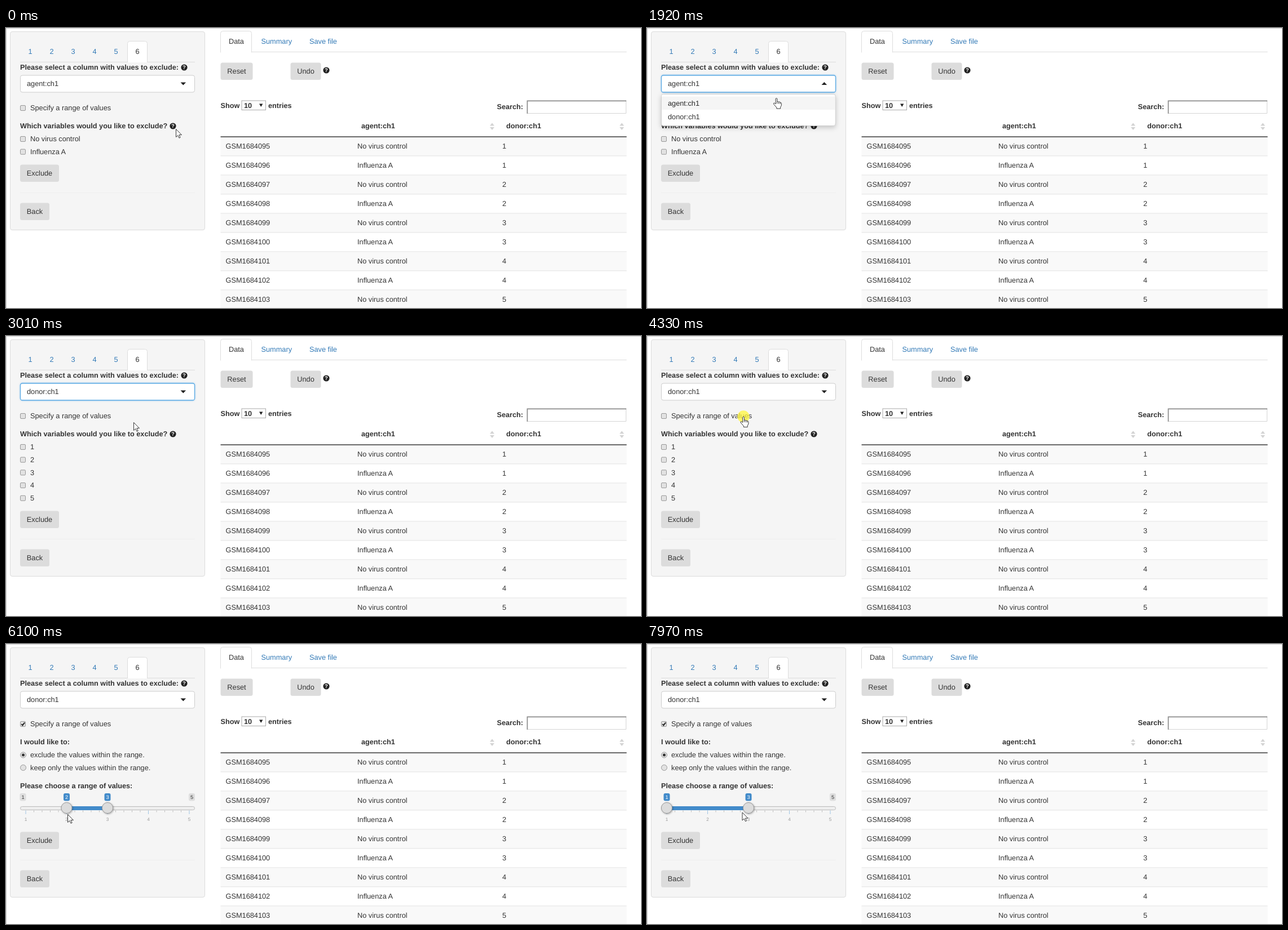
An HTML page for the animation above (8000 ms loop, 1126 px wide and 497 px high).

```html
<!DOCTYPE html>
<html lang="en">
<head>
<meta charset="utf-8">
<title>Exclude values</title>
<style>
  html, body { margin: 0; width: 100%; height: 100%; overflow: hidden; background: #fff; }
  svg { display: block; width: 1126px; height: 497px; }
  text { font: 12.75px "Liberation Sans", Arial, sans-serif; fill: #333; text-rendering: geometricPrecision; white-space: pre; }
  .b { font-weight: bold; font-size: 12.68px; }
  .mid { text-anchor: middle; }
  .link { fill: #337ab7; }
  .help { font-size: 9.5px; font-weight: bold; fill: #fff; }
  .badge { font-size: 9.2px; }
  .grid { font-size: 8.2px; fill: #999; }
  .inv { fill: #fff; }
  .btn { fill: #dcdcdc; }
  .line { stroke: #ddd; fill: none; }
  .box { fill: #e2e2e2; stroke: #989898; }
  .cursor path { fill: #fff; stroke: #222; stroke-width: .9; stroke-linejoin: round; }
  .option rect { fill: #fff; }
  .option.active rect { fill: #f5f5f5; }
  .active text { fill: #262626; }
  #field { fill: #fff; stroke: #ccc; }
  #field.focus { stroke: #5aa9e3; stroke-width: 1.3; filter: drop-shadow(0 0 1.5px rgba(102, 175, 233, .6)); }
  #list { filter: drop-shadow(0 3px 4px rgba(0, 0, 0, .2)); }
</style>
</head>
<body>
<svg id="stage" viewBox="0 0 1126 497"></svg>
<script>
// Markup helpers; text is placed by its vertical centre
const text = (x, y, str, cls = '') => `<text x="${x}" y="${y + 4.1}" class="${cls}">${str}</text>`;
const small = (x, y, str, cls) => `<text x="${x}" y="${y + 3.2}" class="mid ${cls}">${str}</text>`;
const rect = (x, y, w, h, attrs = '') => `<rect x="${x}" y="${y}" width="${w}" height="${h}" ${attrs}/>`;
const path = (d, attrs = '') => `<path d="${d}" ${attrs}/>`;
const circle = (x, y, r, attrs = '') => `<circle cx="${x}" cy="${y}" r="${r}" ${attrs}/>`;
const group = (id, body, attrs = '') => `<g id="${id}" ${attrs}>${body}</g>`;
const help = (x, y) => circle(x, y, 5.6, 'fill="#222"') + small(x, y + .2, '?', 'help');
const button = (x, y, w, str) =>
  rect(x, y, w, 30.5, 'rx="3.5" class="btn"') + text(x + w / 2, y + 15.3, str, 'mid');
const check = (y, str) => rect(25.5, y - 4.5, 9, 9, 'rx="1.5" class="box"') + text(43, y, str);
const radio = (y, str) => circle(30.5, y, 5, 'class="box"') + text(43, y, str);
const tab = (x, y, w, h) =>
  path(`M${x} ${y + h}V${y + 4}q0 -4 4 -4h${w - 8}q4 0 4 4v${h - 4}`, 'class="line" style="fill:#fff"');
const choices = (id, items) =>
  group(id, items.map((s, i) => check(197 + i * 22.7, s)).join(''));
const sorter = x =>
  path(`M${x - 4} 173.5h8l-4 -5zM${x - 4} 176h8l-4 5z`, 'fill="#d3d3d3"');

const valueX = v => 35 + (v - 1) * 72.5;

function sidebar() {
  const tabs = [1, 2, 3, 4, 5, 6]
    .map(n => text(5 + n * 38, 41.7, n, n < 6 ? 'mid link' : 'mid')).join('');
  return rect(7.5, 6.5, 345, 352, 'id="panel" rx="3.5" fill="#f5f5f5" stroke="#dcdcdc"')
    + path('M25 60.5H335', 'class="line"') + tab(215.5, 23.5, 35, 37.5) + tabs
    + text(25, 70, 'Please select a column with values to exclude:', 'b') + help(316, 70)
    + rect(25.5, 84, 309, 30, 'rx="3.5" id="field"')
    + text(37, 99.3, '').replace('<text', '<text id="chosen"')
    + path('', 'id="caret" fill="#222"')
    + check(142, 'Specify a range of values')
    + path('M27.3 142l2 2.4l3.8 -5', 'id="tick" fill="none" stroke="#222" stroke-width="1.9"')
    + group('which', text(25, 173.8, 'Which variables would you like to exclude?', 'b') + help(296, 174))
    + choices('agents', ['No virus control', 'Influenza A'])
    + choices('donors', [1, 2, 3, 4, 5])
    + group('range', range())
    + group('foot', button(25, 242.5, 69, 'Exclude')
      + path('M25 292.5H335', 'stroke="#eee"') + button(25, 310.5, 52, 'Back'))
    + group('list', rect(25.5, 117.5, 308.5, 56, 'rx="3" fill="#fff" stroke="#d0d0d0"')
      + option('agent', 133.7) + option('donor', 157.4));
}

const option = (name, y) =>
  group(name, rect(26, y - 12, 307.5, 23.5) + text(37, y, name + ':ch1'), 'class="option"');

const badge = (x, n, live) =>
  rect(x - 5.5, 265, 11, 13.5, `rx="3" fill="${live ? '#428bca' : '#dedede'}"`)
  + small(x, 272, n, live ? 'badge inv' : 'badge');

const thumb = (id, v) =>
  group(id, badge(valueX(v), v, true).replace('<text', `<text id="${id}Value"`)
    + circle(valueX(v), 291, 9.6, 'fill="#dcdcdc" stroke="#999" style="filter:drop-shadow(1px 1px 1.5px rgba(0,0,0,.3))"'));

function range() {
  let ticks = '', labels = '';
  for (let i = 0; i <= 20; i++) {
    const big = i % 5 === 0, x = valueX(1 + i / 5);
    ticks += path(`M${x} 295.5v${big ? 6.5 : 3}`, `stroke="${big ? '#9fc4e3' : '#bbb'}"`);
    if (big) labels += small(x, 311, 1 + i / 5, 'grid');
  }
  return text(25, 173.8, 'I would like to:', 'b')
    + radio(197, 'exclude the values within the range.') + circle(30.5, 197, 2.5, 'fill="#333"')
    + radio(219.5, 'keep only the values within the range.')
    + text(25, 251.5, 'Please choose a range of values:', 'b')
    + group('min', badge(30, 1)) + badge(329.5, 5)
    + ticks + labels
    + rect(25.5, 288.5, 309, 6, 'rx="3" fill="#eee" stroke="#bbb"')
    + rect(0, 288, 0, 7, 'id="bar" fill="#428bca"')
    + thumb('low', 2) + thumb('high', 3);
}

function results() {
  let rows = '';
  for (let i = 0; i < 9; i++) {
    const y = 209.8 + i * 34;
    rows += rect(380.5, y - 16, 720, 33, `fill="${i % 2 ? '#fff' : '#f9f9f9'}"`)
      + path(`M380.5 ${y + 17.2}H1100.5`, 'class="line"')
      + text(389.5, y, 'GSM' + (1684095 + i))
      + text(623, y, i % 2 ? 'Influenza A' : 'No virus control')
      + text(880, y, 1 + (i >> 1));
  }
  return path('M380.5 42.5H1100.5', 'class="line"') + tab(380.5, 5.5, 55, 38)
    + text(408.5, 23.6, 'Data', 'mid') + text(452.5, 23.6, 'Summary', 'link') + text(538, 23.6, 'Save file', 'link')
    + button(380.5, 61.5, 57, 'Reset') + button(504.5, 61.5, 54, 'Undo') + help(568, 75)
    + text(380.5, 137.5, 'Show', 'b') + rect(418, 129, 42.5, 16.5, 'fill="#fff" stroke="#aaa"')
    + text(422, 137.5, '10', 'b') + path('M449 134.5h6.4l-3.2 5.5z', 'fill="#222"')
    + text(465, 137.5, 'entries', 'b') + text(870.5, 140, 'Search:', 'b')
    + rect(924, 129, 176, 23, 'fill="#fff"')
    + path('M924 151.5H1099.5V129', 'stroke="#d5d5d5" fill="none"')
    + path('M924.4 152V129.4H1100', 'stroke="#8c8c8c" stroke-width="1.7" fill="none"')
    + text(630, 174.3, 'agent:ch1', 'b') + text(887, 174.3, 'donor:ch1', 'b')
    + sorter(862) + sorter(1092) + rows
    + path('M380.5 193.2H1100.5', 'stroke="#111" stroke-width="1.2"');
}

const pointer = circle(0, 0, 10.7, 'id="press" fill="#fff53c" opacity=".75"')
  + group('arrow', path('M.5 .5V14.6L3.7 11.6L6 16.3L8.1 15.3L5.9 10.7H10.4Z'))
  + group('hand', path('M4.3 1.6q0 -1.3 1.3 -1.3t1.4 1.3V7q.5 -1.2 1.7 -.9q.9 .2 1 1.1q.6 -.9 1.8 -.4q.7 .3 .8 1.2q.7 -.5 1.6 .2q.6 .4 .6 1.6V13l-1.7 3.2v2.5H6v-1.9L1 11q-1 -1.3 0 -2q1 -.5 2 .4l1.3 1.3Z')
    + path('M7 7v3M9.7 7.2v3M12.3 8v2.5'), 'transform="translate(-5.6)"');

document.getElementById('stage').innerHTML = sidebar() + results()
  + path('M.5 497V.5H1126', 'stroke="#cfcfcf" fill="none"')
  + group('cursor', pointer, 'class="cursor"');

const el = {};
document.querySelectorAll('[id]').forEach(e => el[e.id] = e);
const show = (id, on) => el[id].style.display = on ? '' : 'none';
const within = (t, a, b) => t >= a && t < b;

// Pointer moves: start, end, number of steps, destination
const moves = [
  [70, 600, 8, 236, 89], [830, 830, 1, 234, 88],
  [1540, 2310, 11, 226, 152], [2380, 2460, 2, 226, 153],
  [3240, 3850, 9, 171, 143], [4940, 5730, 11, 155, 228],
  [5800, 6100, 5, 109, 302], [6180, 6350, 3, 107, 294],
  [6740, 7280, 8, 36, 292], [7660, 7970, 5, 168.5, 298.5]
];
const presses = [[1140, 1310], [2770, 3010], [4330, 4480], [6570, 7510]];

function pointerAt(t) {
  let x = 301, y = 179;
  for (const [start, end, steps, toX, toY] of moves) {
    if (t < start) break;
    const gap = (end - start) / (steps - 1) || 1;
    const p = Math.min(steps, Math.floor((t - start + 15) / gap) + 1) / steps;
    const ease = p * p * (3 - 2 * p);
    x += (toX - x) * ease;
    y += (toY - y) * ease;
  }
  return [x, y];
}

function render(t) {
  const [x, y] = pointerAt(t);
  const open = within(t, 1210, 2850), donor = t >= 2850;
  const checked = t >= 4480, ranged = t >= 4710;
  const drag = within(t, 6570, 7510);
  const low = t >= 6740 && (x < 71 || t >= 7280) ? 1 : 2, lowX = valueX(low);

  el.field.classList.toggle('focus', within(t, 1140, 4330));
  el.chosen.textContent = donor ? 'donor:ch1' : 'agent:ch1';
  el.caret.setAttribute('d', open ? 'M309.5 101h9.6l-4.8 -5z' : 'M309.5 96.5h9.6l-4.8 5z');
  show('list', open);
  el.agent.classList.toggle('active', y < 146);
  el.donor.classList.toggle('active', y >= 146);

  show('tick', checked);
  show('which', !checked);
  show('agents', t < 2930);
  show('donors', within(t, 2930, 4480));
  show('range', ranged);
  const shift = ranged ? 91 : checked ? -79 : t >= 2930 ? 68 : 0;
  el.foot.setAttribute('transform', `translate(0 ${shift})`);
  el.panel.setAttribute('height', 352 + shift);

  show('min', low > 1);
  el.low.setAttribute('transform', `translate(${lowX - valueX(2)})`);
  el.lowValue.textContent = low;
  el.bar.setAttribute('x', lowX);
  el.bar.setAttribute('width', valueX(3) - lowX);

  const hand = drag
    || within(y, 84, 115)
    || open
    || (x < 187 && within(y, 133, 152))
    || (ranged && x < 256 && within(y, 188, 228))
    || (ranged && Math.hypot(x - lowX, y - 291) < 10);
  show('hand', hand);
  show('arrow', !hand);
  show('press', presses.some(([a, b]) => within(t, a, b)));
  el.cursor.setAttribute('transform', `translate(${x} ${y})`);
}

const begin = performance.now();
function tick() {
  render((performance.now() - begin) % 8000);
  requestAnimationFrame(tick);
}
tick();
</script>
</body>
</html>
```
